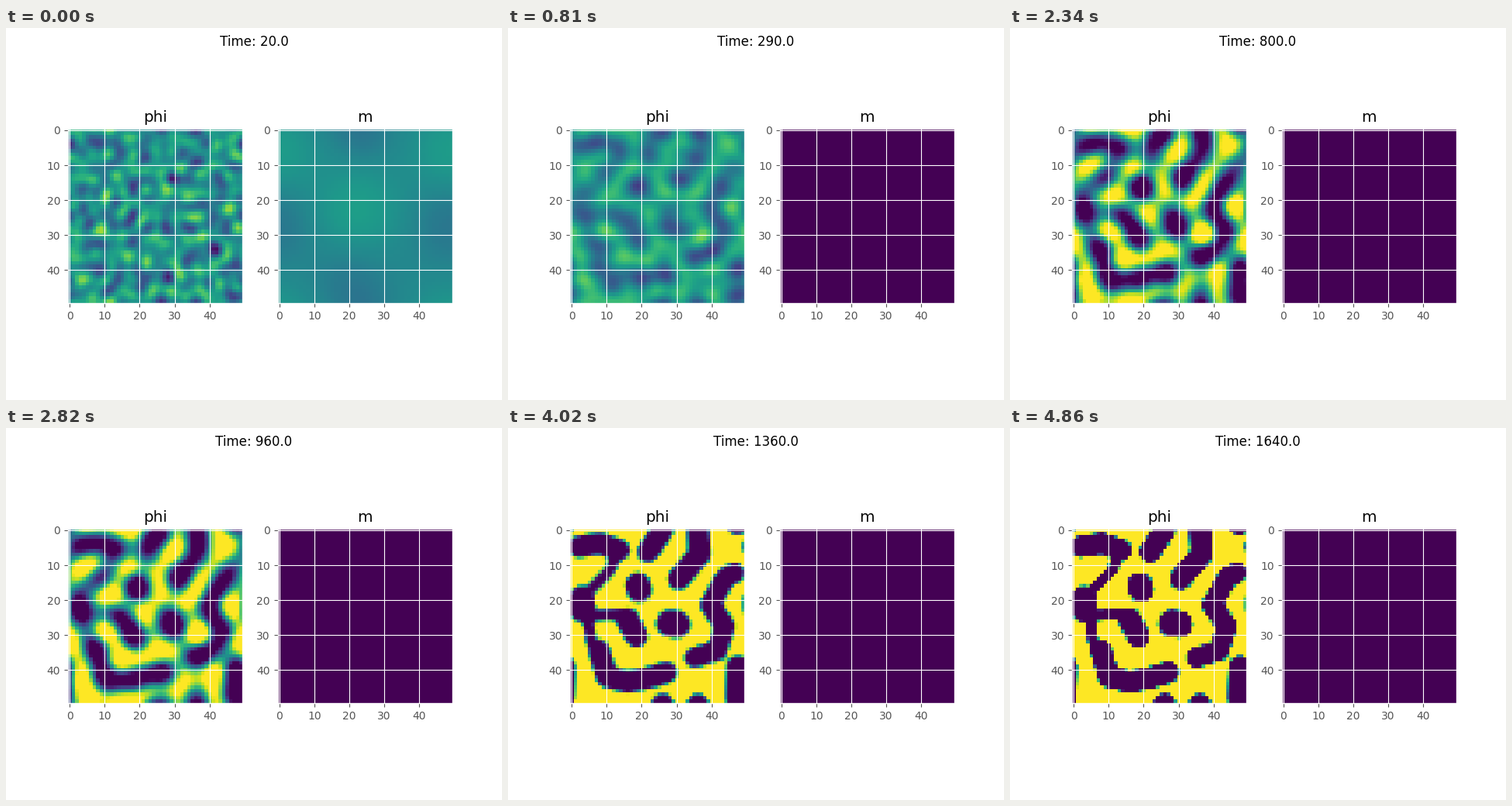
Recreate the animation shown at these times as a matplotlib script. Size 640 by 480 pixels, loop 4.89 s.

```python
import numpy as np
import matplotlib.pyplot as plt
from matplotlib.animation import FuncAnimation

plt.style.use("ggplot")

N = 50
FRAMES = 163
INTERVAL = 30
Y, X = np.mgrid[0:N, 0:N].astype(float)

# Centre lines of the settled dark domains: radius, then points
DOMAINS = [
    (3.1, (2, 4.8), (8, 3.8), (13.5, 5.8)),
    (1.5, (13, 7), (11, 11.5), (6, 16.5)),
    (3.7, (2.8, 19.7), (2.8, 22.6)),
    (1.5, (15, 24), (4.5, 24.5), (5.5, 32)),
    (3.1, (7.8, 34.5), (10, 42), (16, 43.5), (22, 42.3), (27, 40.7)),
    (3.6, (18.9, 15.8), (19.3, 17.2)),
    (3.3, (16, 25.7), (18.5, 30.3)),
    (3.9, (28, 26.7), (30, 27)),
    (3.1, (26, -.2), (21.8, 6.3)),
    (3.2, (36, 0), (36.5, 7), (30.5, 14)),
    (2.9, (46.6, 12.3), (44, 13.5), (39.5, 21.5), (43.8, 27.5), (41.5, 34.5), (35, 36.5)),
    (3.4, (47.6, 39.3), (47.3, 48)),
]


def wrap(d):
    return (d + N / 2) % N - N / 2


def bump(x, y, height, sigma):
    """Gaussian on the periodic grid."""
    r2 = wrap(X - x) ** 2 + wrap(Y - y) ** 2
    return height * np.exp(-r2 / (2 * sigma ** 2))


def segment_distance(a, b):
    """Distance to a segment, measured from its middle on the periodic grid."""
    half = (np.array(b) - a) / 2
    mid = a + half
    dx, dy = wrap(X - mid[0]), wrap(Y - mid[1])
    along = np.clip((dx * half[0] + dy * half[1]) / (half @ half), -1, 1)
    return np.hypot(dx - along * half[0], dy - along * half[1])


def smoothstep(u):
    u = np.clip(u, 0, 1)
    return u * u * (3 - 2 * u)


def to_grid(spectrum):
    return np.fft.ifft2(spectrum).real


k = 2 * np.pi * np.fft.fftfreq(N)
k2 = k[:, None] ** 2 + k[None, :] ** 2

walls = np.min([segment_distance(a, b) - radius
                for radius, *points in DOMAINS
                for a, b in zip(points, points[1:])], axis=0)
settled = np.fft.fft2(np.tanh(walls))

# Early stage: each Fourier mode grows or decays at its own rate, so the
# band-limited domains at t = 550 are rewound to t = 0 and noise is added.
rate = .0158 * k2 - .024 * k2 ** 2
band = settled * k2 * np.exp(-3 * k2)
band *= .43 / to_grid(band).std()
rewind = np.exp(-550 * np.where(k2 < .81, rate, 0))
noise = np.fft.fft2(np.random.default_rng(7).normal(0, 1.1, (N, N)))
start = band * rewind + noise * (1 - np.exp(-k2 ** 2))

m_shape = (bump(22, 23, .1, 9) + bump(49, 6, .09, 8) - bump(20, 43, .06, 7)
           - bump(49, 27, .07, 7) - bump(24, 2, .05, 5))


def phi_at(t):
    early = to_grid(start * np.exp(rate * t))
    # Late stage: the domain walls get thinner and steeper
    blur = 1.4 * np.exp(-(t - 1110) / 400)
    gain = 1.8 * np.exp((t - 1110) / 500)
    late = gain * to_grid(settled * np.exp(-k2 * blur ** 2 / 2))
    mix = smoothstep((t - 780) / 420)
    return (1 - mix) * np.clip(early, -1.8, 1.8) + mix * late


def m_at(t):
    elapsed = t - 20
    return .46 - .41 * elapsed / 60 + m_shape * (1 + .025 * elapsed)


fig, axes = plt.subplots(1, 2, figsize=(6.4, 4.8), dpi=100)
images = []
for ax, name, low in zip(axes, ("phi", "m"), (-1, 0)):
    images.append(ax.imshow(np.zeros((N, N)), cmap="viridis", vmin=low, vmax=1))
    ax.set(title=name, xticks=range(0, N, 10), yticks=range(0, N, 10))
clock = fig.suptitle("", y=.982)


def update(i):
    t = 20.0 + 10 * i
    images[0].set_data(phi_at(t))
    images[1].set_data(m_at(t))
    clock.set_text(f"Time: {t:.1f}")
    return [*images, clock]


anim = FuncAnimation(fig, update, frames=FRAMES, interval=INTERVAL,
                     init_func=lambda: update(0), repeat=True, repeat_delay=0)
plt.show()
```
